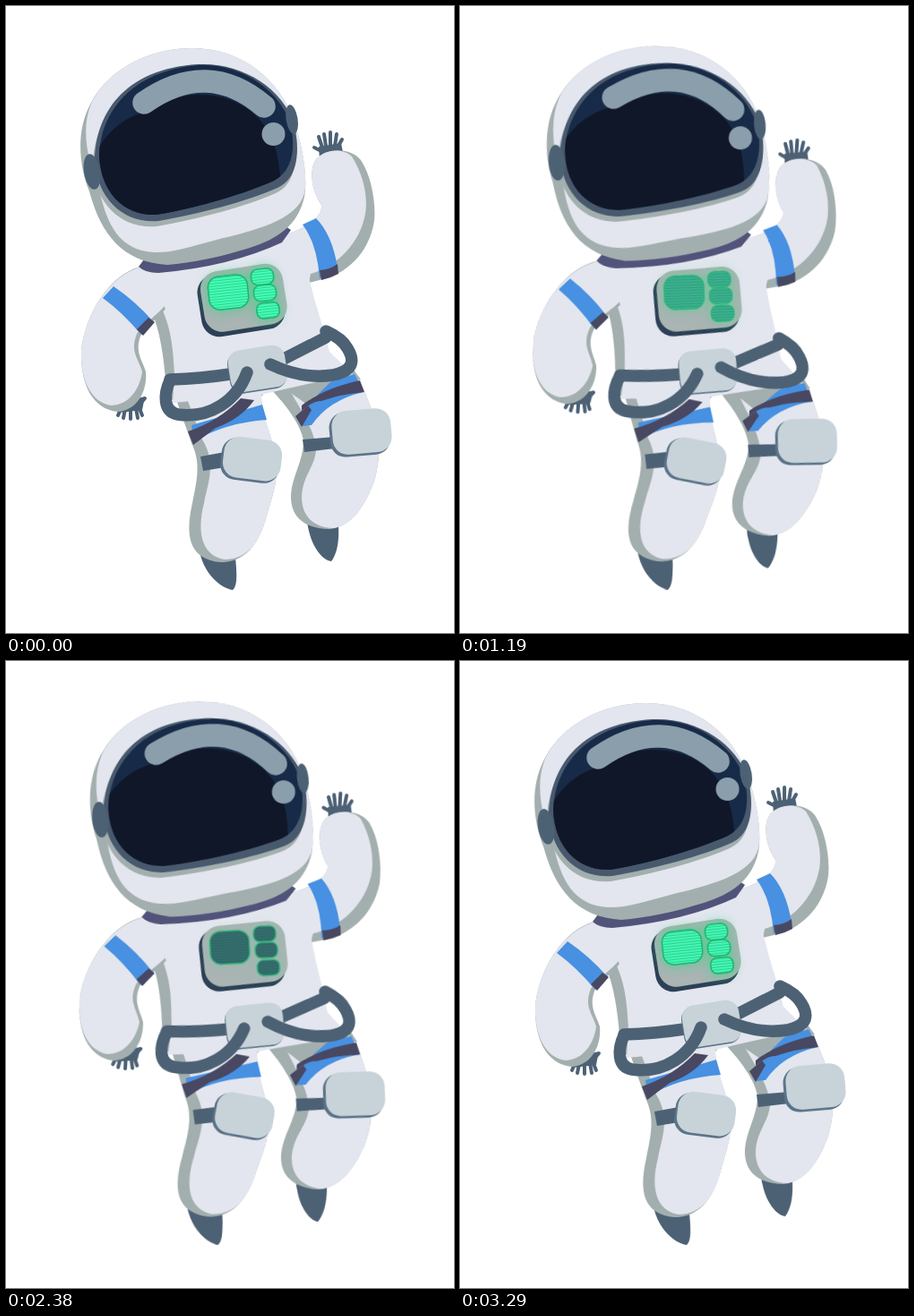
An HTML page for the animation above (3360 ms loop, 500 by 700 pixels).

```html
<!DOCTYPE html>
<html lang="en">
<head>
<meta charset="utf-8">
<title>Floating astronaut</title>
<style>
  html, body { margin: 0; width: 100%; height: 100%; overflow: hidden; background: #fff; }
  svg { display: block; width: 100vw; height: 100vh; }

  .light { fill: #e3e6ee; }
  .shade { fill: #a3afae; }
  .slate { fill: #4d6175; }
  .blue { fill: #4790e2; }
  .dusk { fill: #484862; }
  .pad { fill: #c7d3d8; }
  .rim { fill: #5b7389; }
  .tube, .finger { fill: none; stroke: #4d6175; stroke-linecap: round; }
  .tube { stroke-width: 13.5; }
  .finger { stroke-width: 4; }
  .off { fill: #2f4959; stroke: #3fb684; stroke-width: 1.5; }
  .lit { fill: url(#scan); stroke: #1fb573; stroke-width: 1.5; }
  .halo { fill: #35d583; stroke: #35d583; stroke-width: 6; opacity: .6; filter: url(#blur); }

  #astronaut {
    transform-origin: 245px 350px;
    animation: sway 1680ms cubic-bezier(.37, 0, .63, 1) infinite alternate;
  }
  #lights { animation: pulse 1680ms linear infinite; }

  @keyframes sway {
    from { transform: rotate(0deg); }
    to { transform: rotate(5deg); }
  }
  @keyframes pulse {
    0%, 100% { opacity: 1; }
    12.5%, 87.5% { opacity: .92; }
    33.3%, 66.7% { opacity: .5; }
    45.8%, 54.2% { opacity: .06; }
    50% { opacity: 0; }
  }
</style>
</head>
<body>
<svg viewBox="0 0 500 700">
  <defs>
    <pattern id="scan" width="8" height="3" patternUnits="userSpaceOnUse">
      <rect width="8" height="3" fill="#25dc90"/>
      <rect width="8" height="1.6" fill="#50ffc0"/>
    </pattern>
    <filter id="blur" x="-50%" y="-50%" width="200%" height="200%">
      <feGaussianBlur stdDeviation="6"/>
    </filter>
    <g id="screens">
      <rect x="226" y="301" width="44" height="37" rx="12" transform="rotate(-6 248 319)"/>
      <rect x="273.500" y="293.500" width="25" height="17.500" rx="7" transform="rotate(-6 286 302)"/>
      <rect x="276.500" y="311.500" width="25" height="17.500" rx="7" transform="rotate(-6 289 320)"/>
      <rect x="280" y="331" width="25" height="17.500" rx="7" transform="rotate(-6 292 340)"/>
    </g>
    <path id="visor" d="M99 175C99 122 130 70 215 65C264 63 308 92 321 130C329 161 326 193 303 203C270 218 215 232 170 240C130 243 103 215 99 175Z"/>
    <path id="glass" d="M104 167C105 119 140 72 215 66C264 64 304 94 317 130C324 158 320 184 299 195C268 209 215 225 168 233C133 235 106 210 104 167Z"/>
    <clipPath id="inGlass"><use href="#glass"/></clipPath>
  </defs>

  <g id="astronaut">
    <!-- boots and hands -->
    <g class="slate">
      <path d="M216 609C220 630 236 649 253 652C258 648 258 636 256 616Z"/>
      <path d="M336 575C339 600 351 618 363 620C370 611 372 596 371 580Z"/>
      <path d="M121 444L155 436L152 451L126 454Z"/>
      <path class="finger" d="M128 450L125 457M133 450L131 460M139 450L139 461M145 449L147 460M148 447L152 457M149 445L155 438"/>
      <path d="M349 157L374 153L377 168L350 171Z"/>
      <path class="finger" d="M353 158L349 146M357 156L355 143M362 156L362 141M367 156L369 143M371 156L375 149M352 162L344 158"/>
    </g>

    <!-- left leg -->
    <path class="shade" d="M185 425L207 488C218 510 213 530 208 555C200 590 203 618 240 621C270 621 285 595 292 565C300 540 304 525 301 505C298 480 285 460 285 436L296 422Z"/>
    <path class="light" d="M197 425L219 484C235 510 226 530 221 555C212 590 220 615 245 618C272 617 285 595 292 565C300 540 304 525 301 505C298 480 285 460 285 434L290 422Z"/>
    <path class="blue" d="M207 468L286 445L291 462Q245 465 210 486Z"/>
    <path class="dusk" d="M203 475Q238 463 262 438L277 440Q262 461 234 471L209 490Z"/>
    <path class="slate" d="M217 503L244 498V515L220 519Z"/>
    <g transform="rotate(7 274 506)">
      <rect class="rim" x="240" y="484" width="66" height="47" rx="17"/>
      <rect class="pad" x="242.500" y="482.500" width="65" height="46" rx="17"/>
    </g>

    <!-- right leg -->
    <path class="shade" d="M294 426C315 448 329 468 332 485C332 510 318 525 318 550C319 572 335 584 362 584C388 580 402 555 411 530C417 510 417 495 414 475C410 450 400 430 388 405L330 410Z"/>
    <path class="light" d="M316 428C330 452 345 475 346 495C345 515 330 525 330 550C331 570 343 582 366 583C388 579 402 555 411 530C417 510 417 495 414 475C410 450 400 430 390 410L345 416Z"/>
    <path class="shade" d="M306 424L365 412L390 409L396 417Q352 426 335 444Z"/>
    <path class="blue" d="M327 460Q342 438 362 420L389 411L399 431Q360 440 341 468L330 469Z"/>
    <path class="dusk" d="M330 446Q354 427 395 418L400 431Q375 433 352 441Q342 441 330 452Z"/>
    <path class="dusk" d="M323 458L337 446L341 451L330 470Z"/>
    <path class="slate" d="M331 484L367 481V494L333 498Z"/>
    <g transform="rotate(-5 397 475)">
      <rect class="rim" x="361" y="452" width="67" height="50" rx="17"/>
      <rect class="pad" x="364" y="450.500" width="66" height="49" rx="17"/>
    </g>

    <!-- right arm -->
    <path class="shade" d="M310 256C335 248 354 235 352 222C340 205 338 180 347 170C360 158 385 158 396 172C408 190 413 220 411 240C405 278 378 299 354 305L338 309L318 300Z"/>
    <path class="light" d="M310 256C335 248 354 235 352 222C340 205 338 180 347 170C358 159 377 159 386 168C400 190 404 215 401 232C395 265 370 290 340 299L338 309L318 300Z"/>
    <path class="blue" d="M331 244Q347 265 350 304L370 292Q364 255 346 237Z"/>
    <path class="dusk" d="M350 295Q362 294 370 288L371 299Q362 304 352 306Z"/>

    <!-- torso -->
    <path class="shade" d="M152 292L174 338L165 347C175 375 177 405 180 440L240 436V300Z"/>
    <path class="light" d="M150 292L320 252L336 296L345 330L354 360L361 386L387 411L310 428L285 434L186 443L188 410C186 385 186 365 174 338Z"/>

    <!-- left arm -->
    <path class="shade" d="M150 291C115 300 88 345 84 385C83 420 95 450 125 453C148 451 158 428 156 408C152 395 142 385 152 364C156 356 168 352 178 338Z"/>
    <path class="light" d="M152 291C115 300 88 345 84 385C83 418 95 443 118 446C139 445 150 425 152 408C148 394 138 386 146 366C151 357 163 350 176 336L180 290Z"/>
    <path class="blue" d="M120 313Q145 330 164 352L151 367Q130 342 108 326Z"/>
    <path class="dusk" d="M159 348L166 353L153 368L146 361Z"/>

    <!-- belt and tubes -->
    <path class="tube" d="M183 417Q218 416 250 411M310 394L357 370"/>
    <g transform="rotate(-9 280 405)">
      <rect class="rim" x="248" y="383" width="64" height="47" rx="14"/>
      <rect class="pad" x="249" y="381.500" width="64" height="47" rx="14"/>
    </g>
    <path class="tube" d="M183 418C176 433 175 453 192 456C228 461 258 440 269 409"/>
    <path class="tube" d="M295 400C320 412 345 415 365 412C389 407 389 395 381 382C376 373 366 367 357 363"/>

    <!-- chest panel -->
    <g transform="rotate(-9 264 327)">
      <rect fill="#2c4156" x="215" y="295" width="94" height="70" rx="20"/>
      <rect fill="#a9b4b3" x="219" y="292" width="93" height="68" rx="20"/>
    </g>
    <use href="#screens" class="off"/>
    <g id="lights">
      <use href="#screens" class="halo"/>
      <use href="#screens" class="lit"/>
    </g>

    <!-- collar -->
    <path fill="#51537a" d="M148 291Q155 298 170 298Q250 291 308 264L318 250L300 238L160 275Z"/>

    <!-- helmet -->
    <path class="shade" d="M208 47C265 47 306 85 320 125C331 155 337 190 333 213C326 245 303 260 272 270C240 280 207 287 180 289C130 286 106 255 93 207C82 180 77 140 95 108C115 70 160 47 208 47Z"/>
    <path class="light" d="M208 47C265 47 306 85 320 125C331 155 337 190 333 209C325 240 275 251 235 261C205 269 185 276 165 275C127 273 113 244 105 209C92 175 82 138 96 107C115 70 160 47 208 47Z"/>
    <use href="#visor" class="shade" transform="translate(-2 6)"/>
    <use href="#visor" fill="#48596e"/>
    <use href="#glass" fill="#172b48"/>
    <path clip-path="url(#inGlass)" fill="#101729" d="M100 165C112 140 135 122 155 119C180 98 230 90 265 112C290 128 303 150 306 190L290 240H100Z"/>
    <path d="M154 108Q225 58 288 112" fill="none" stroke="#8b9eab" stroke-width="25.500" stroke-linecap="round"/>
    <circle cx="298.500" cy="143" r="13" fill="#8b9eab"/>
    <g class="slate">
      <ellipse cx="96" cy="185" rx="9" ry="20" transform="rotate(-9 96 185)"/>
      <ellipse cx="319" cy="126.500" rx="6.500" ry="16.500" transform="rotate(-9 319 126)"/>
    </g>
  </g>
</svg>
</body>
</html>
```
